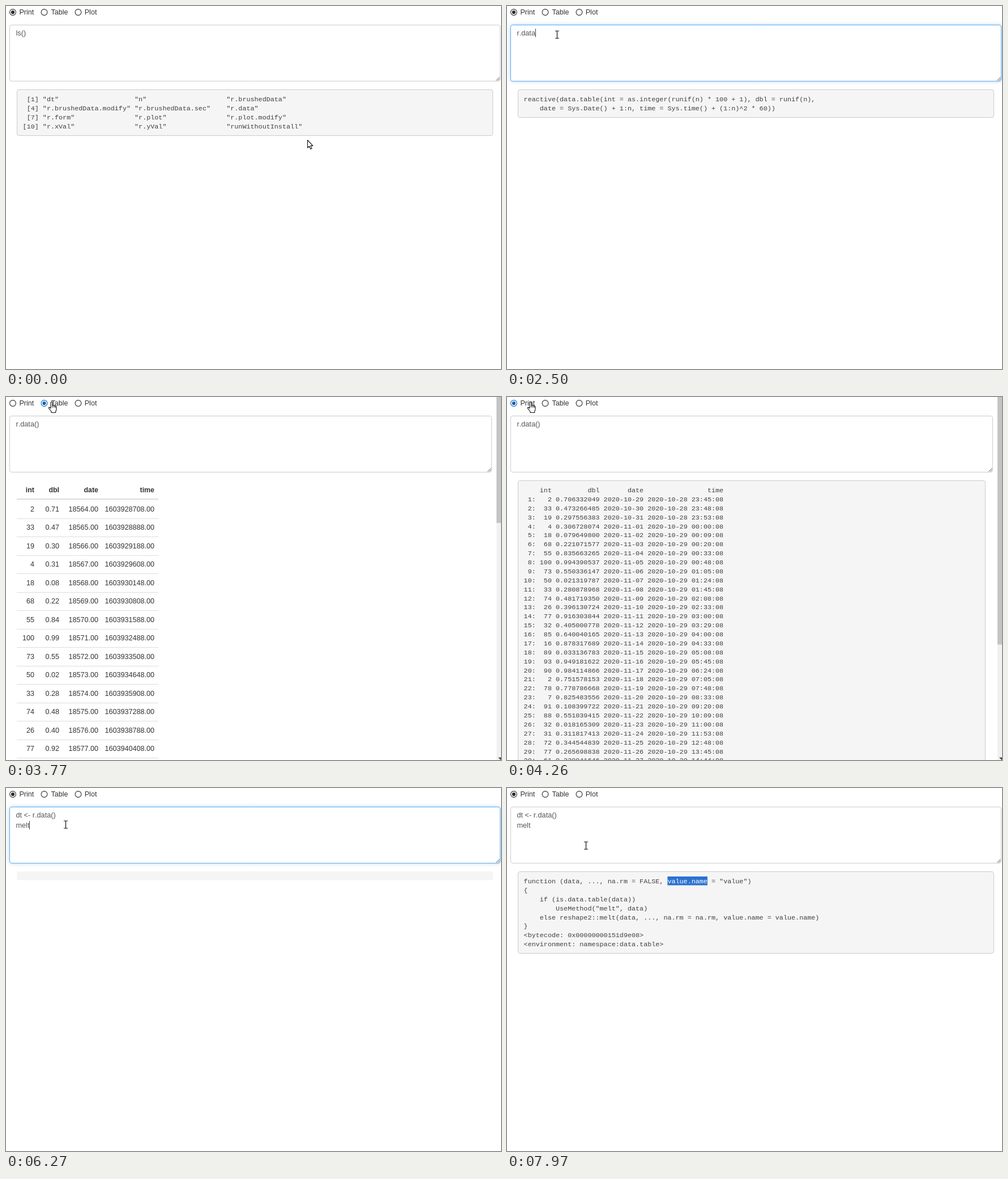
An HTML page with a canvas for the animation above (8 s loop, 874 by 640 pixels).

```html
<!DOCTYPE html>
<html lang="en">
<head>
<meta charset="utf-8">
<title>R console</title>
<style>
  html, body { margin: 0; width: 100%; height: 100%; overflow: hidden; background: #fff; }
  canvas { display: block; }
</style>
</head>
<body>
<canvas id="stage" width="874" height="640"></canvas>
<script>
const ctx = document.getElementById('stage').getContext('2d');
const LOOP = 8000, STEP = LOOP / 104;
const MONO = '11.75px "Liberation Mono", monospace';
const LABEL = '12.6px "Liberation Sans", Arial, sans-serif';
const INPUT = '12.7px "Liberation Sans", Arial, sans-serif';
const BOLD = 'bold 12.4px "Liberation Sans", Arial, sans-serif';
const CHAR = 7.05, LINE = 15.88, PRE_X = 29.6, BASE_Y = 168;
const SELECT = '#2c72d0', CODE = '#404040';

const clamp = v => Math.max(0, Math.min(1, v));
const ease = k => k * k * (3 - 2 * k);
const latest = (list, t) => list.filter(e => e.at <= t).pop();

function seeded(seed) {
  return () => (seed = seed * 16807 % 2147483647) / 2147483647;
}

// the data set mirrors the R expression: runif values, daily dates, squared minutes
const SECOND = 1000, MINUTE = 60 * SECOND, DAY = 1440 * MINUTE;
const START = Date.UTC(2020, 9, 28, 23, 44, 8);
const runif = seeded(2020);
const rows = Array.from({ length: 30 }, (_, i) => ({
  int: Math.floor(runif() * 100 + 1),
  dbl: runif(),
  date: START + (i + 1) * DAY,
  time: START + (i + 1) ** 2 * MINUTE
}));
const stamp = (ms, length) => new Date(ms).toISOString().slice(0, length).replace('T', ' ');

const LISTING = [
  ['dt', 'n', 'r.brushedData'],
  ['r.brushedData.modify', 'r.brushedData.sec', 'r.data'],
  ['r.form', 'r.plot', 'r.plot.modify'],
  ['r.xVal', 'r.yVal', 'runWithoutInstall']
].map((names, i) => `[${i * 3 + 1}]`.padStart(4) + ' ' +
  names.map(n => `"${n}"`.padEnd(22)).join(' '));

const REACTIVE = [
  'reactive(data.table(int = as.integer(runif(n) * 100 + 1), dbl = runif(n), ',
  '    date = Sys.Date() + 1:n, time = Sys.time() + (1:n)^2 * 60))'
];

const DATA = ['    int         dbl       date                time'].concat(rows.map((r, i) =>
  `${i + 1}:`.padStart(3) + `${r.int}`.padStart(4) +
  ` ${r.dbl.toFixed(9)} ${stamp(r.date, 10)} ${stamp(r.time, 19)}`));

const MELT = [
  'function (data, ..., na.rm = FALSE, value.name = "value") ',
  '{',
  '    if (is.data.table(data)) ',
  '        UseMethod("melt", data)',
  '    else reshape2::melt(data, ..., na.rm = na.rm, value.name = value.name)',
  '}',
  '<bytecode: 0x00000000151d9e08>',
  '<environment: namespace:data.table>'
];

const OUTPUTS = [
  { at: 0, lines: LISTING },
  { at: 2350, lines: REACTIVE },
  { at: 3080, lines: DATA, thumb: 436.5 },
  { at: 3720, lines: DATA, thumb: 222, table: true },
  { at: 4160, lines: DATA, thumb: 436.5 },
  { at: 5040, lines: DATA, thumb: 436.5, alpha: 0.3 },
  { at: 5400, lines: [] },
  { at: 6600, lines: MELT }
];

const EDITS = [
  { at: 0, paste: 'ls()' },
  { at: 2050, paste: 'r.data' },
  { at: 2640, keys: '()', gap: 80 },
  { at: 4560, keys: 'dt <- ', gap: 90, home: true },
  { at: 5700, keys: '\nmelt', gap: 100 }
];

const RADIOS = [
  { name: 'Print', cx: 12, x: 24 },
  { name: 'Table', cx: 67.5, x: 80 },
  { name: 'Plot', cx: 127.5, x: 139.3 }
];
const MODES = [{ at: 0, on: 'Print' }, { at: 3660, on: 'Table' }, { at: 4080, on: 'Print' }];
const FOCUS = [{ on: 1800, off: 3560 }, { on: 4560, off: 7400 }];

// pointer moves: start, end, destination; it rests in between
const HOME = { x: 532, y: 236 };
const MOVES = [
  [80, 460, 393, 182], [540, 850, 443, 184], [940, 1400, 52, 44], [1800, 1960, 20, 47],
  [2100, 2330, 88, 50], [2950, 3450, 84, 8], [3720, 4040, 42, 8], [4330, 4500, 18, 47],
  [4640, 5900, 130, 77], [5900, 6060, 105, 64], [6880, 7400, 335, 162], [7700, 7920, 139, 101]
];

function pointerAt(t) {
  let { x, y } = HOME;
  for (const [start, end, toX, toY] of MOVES) {
    const k = ease(clamp((t - start) / (end - start)));
    x += (toX - x) * k;
    y += (toY - y) * k;
  }
  return { x: Math.round(x), y: Math.round(y) };
}

function focusAt(t) {
  return Math.max(...FOCUS.map(f => clamp((t - f.on) / 150) * clamp(1 - (t - f.off) / 150)));
}

function inputAt(t) {
  let value = '', caret = 0, since = 0;
  for (const { at, paste, keys, gap, home } of EDITS.filter(e => e.at <= t)) {
    since = at;
    if (paste) {
      value = paste;
      caret = value.length;
      continue;
    }
    const count = Math.min(keys.length, Math.floor((t - at) / gap));
    const typed = keys.slice(0, count);
    since += count * gap;
    value = home ? typed + value : value + typed;
    caret = home ? count : value.length;
  }
  return { value, caret, since };
}

function text(str, x, y, font, color, kerning = 'normal', align = 'left') {
  ctx.font = font;
  ctx.fontKerning = kerning;
  ctx.textAlign = align;
  ctx.fillStyle = color;
  ctx.fillText(str, x, y);
}

function rect(x, y, w, h, color) {
  ctx.fillStyle = color;
  ctx.fillRect(x, y, w, h);
}

function box(x, y, w, h, fill, stroke) {
  ctx.beginPath();
  ctx.roundRect(x, y, w, h, 3.5);
  ctx.fillStyle = fill;
  ctx.fill();
  if (!stroke) return;
  ctx.shadowColor = 'transparent';
  ctx.strokeStyle = stroke;
  ctx.lineWidth = 1;
  ctx.stroke();
}

function disc(x, y, r) {
  ctx.beginPath();
  ctx.arc(x, y, r, 0, Math.PI * 2);
}

function drawRadios(t, pointer) {
  const mode = latest(MODES, t).on;
  for (const { name, cx, x } of RADIOS) {
    const checked = name === mode;
    const hover = pointer.y < 22 && pointer.x > cx - 6 && pointer.x < x + 30;
    const color = checked && hover ? '#0b63b5' : '#2b2b2b';
    disc(cx, 11, 5.4);
    ctx.strokeStyle = color;
    ctx.lineWidth = 1.1;
    ctx.stroke();
    if (checked) {
      disc(cx, 11, 3.1);
      ctx.fillStyle = color;
      ctx.fill();
    }
    text(name, x - 0.6, 15, LABEL, '#333');
  }
}

function drawHandle(right) {
  ctx.beginPath();
  for (const d of [6, 3]) {
    ctx.moveTo(right - 1 - d, 131.5);
    ctx.lineTo(right - 1, 131.5 - d);
  }
  ctx.strokeStyle = '#555';
  ctx.lineWidth = 1;
  ctx.stroke();
}

function drawInput(t, right) {
  const focus = focusAt(t);
  const mix = (a, b) => Math.round(a + (b - a) * focus);
  ctx.save();
  ctx.shadowColor = `rgba(102,175,233,${0.6 * focus})`;
  ctx.shadowBlur = 7;
  box(6.5, 33.5, right - 6.5, 99, '#fff', `rgb(${mix(204, 102)},${mix(204, 175)},${mix(204, 233)})`);
  ctx.restore();
  drawHandle(right);

  const { value, caret, since } = inputAt(t);
  const selected = t >= 1920 && t < 2050;
  if (selected) rect(17.5, 41, 18.5, 14, SELECT);
  value.split('\n').forEach((line, i) =>
    text(line, 17.5, 52 + i * 17.5, INPUT, selected ? '#fff' : '#555', 'none'));

  const blink = Math.floor((t - since) / 530) % 2 === 0;
  if (focus === 1 && blink && !selected) {
    const before = value.slice(0, caret).split('\n');
    const x = 17.5 + ctx.measureText(before[before.length - 1]).width;
    rect(Math.round(x), 40 + Math.round((before.length - 1) * 17.5), 1, 15, '#444');
  }
}

function drawSelection(row, col, word) {
  const x = PRE_X + col * CHAR, y = BASE_Y + row * LINE;
  rect(x, Math.round(y - 12.3), word.length * CHAR, 15.5, SELECT);
  text(word, x, y, MONO, '#fff');
}

function drawOutput(t, lines, right, alpha = 1) {
  ctx.globalAlpha = alpha;
  if (lines.length) {
    box(19.5, 147.5, right - 19.5, Math.round(lines.length * LINE + 17.3), '#f5f5f5', '#ccc');
  } else {
    box(19, 147, right - 18.5, 15.5, '#f5f5f5');
  }
  lines.forEach((line, i) => text(line, PRE_X, BASE_Y + i * LINE, MONO, CODE));
  ctx.globalAlpha = 1;

  if (lines === LISTING && t >= 540 && t < 1800) {
    drawSelection(1, 52, 'r.data'.slice(0, Math.ceil(6 * clamp((t - 540) / 280))));
  }
  if (lines === MELT && t >= 7550) drawSelection(0, 36, 'value.name');
}

function drawTable() {
  const ends = [50, 94, 163, 262], rowH = 32.5;
  const cells = (values, y, font) =>
    values.forEach((v, i) => text(v, ends[i], y, font, '#333', 'normal', 'right'));
  cells(['int', 'dbl', 'date', 'time'], 168, BOLD);
  rect(19, 179, 250, 2, '#ddd');
  rows.slice(0, 15).forEach((r, i) => {
    const y = 181 + i * rowH;
    if (i) rect(19, Math.round(y), 250, 1, '#ddd');
    const numbers = [r.dbl, Math.floor(r.date / DAY), r.time / SECOND].map(v => v.toFixed(2));
    cells([r.int, ...numbers], y + 20.5, LABEL);
  });
}

function drawScrollbar(thumb) {
  rect(866, 0, 8, 640, '#f1f1f1');
  rect(866, 0, 8, thumb, '#c4c4c4');
  ctx.fillStyle = '#404040';
  ctx.beginPath();
  ctx.moveTo(869, 635.5);
  ctx.lineTo(878, 635.5);
  ctx.lineTo(873.5, 640);
  ctx.fill();
}

function outline(d, fill = '#fff') {
  const path = new Path2D(d);
  ctx.lineJoin = 'round';
  ctx.lineWidth = 1.1;
  ctx.strokeStyle = '#111';
  ctx.fillStyle = fill;
  ctx.fill(path);
  ctx.stroke(path);
}

const CURSORS = {
  arrow() {
    outline('M.5 .5V14L3.6 11.2 5.7 16.2 7.9 15.2 5.8 10.4H9.8Z');
  },
  beam() {
    const bar = new Path2D('M-3.5 -6.5H-1Q0 -6.5 0 -5.5Q0 -6.5 1 -6.5H3.5M0 -6V6M-3.5 6.5H-1Q0 6.5 0 5.5Q0 6.5 1 6.5H3.5');
    ctx.translate(0.5, 0.5);
    for (const [width, color] of [[2.6, 'rgba(255,255,255,.8)'], [1.2, '#111']]) {
      ctx.lineWidth = width;
      ctx.strokeStyle = color;
      ctx.stroke(bar);
    }
  },
  hand() {
    ctx.translate(-0.5, 0);
    outline('M-1.5 12V2Q-1.5 .5 0 .5T1.5 2V7Q3 5.8 4.3 7.4Q5.8 6.5 6.8 8.2Q8.5 7.8 8.5 9.8V13.5' +
      'Q8.5 15.5 7.2 17V19.5H-.5V17.5L-4.6 12.4Q-5.6 10.8 -4.4 10.2T-1.5 12Z');
    outline('M1.5 7V10.5M4.4 7.6V10.5M6.8 8.4V10.8', 'transparent');
  }
};

function drawPointer({ x, y }, lines) {
  const textEnd = BASE_Y + (lines.length - 1) * LINE + 7;
  const overText = (y >= 33 && y <= 133) || (y >= 152 && y <= textEnd);
  const overLabel = y < 22 && x < 165;
  ctx.save();
  ctx.translate(x, y);
  CURSORS[overLabel ? 'hand' : overText ? 'beam' : 'arrow']();
  ctx.restore();
}

function draw(t) {
  const pointer = pointerAt(Math.floor(t / STEP) * STEP);
  const { lines, thumb, table, alpha } = latest(OUTPUTS, t);
  const inset = thumb ? 15 : 0;

  rect(0, 0, 874, 640, '#fff');
  drawRadios(t, pointer);
  drawInput(t, 872.5 - inset);
  if (table) drawTable();
  else drawOutput(t, lines, 859.5 - inset, alpha);
  if (thumb) drawScrollbar(thumb);
  drawPointer(pointer, lines);
}

const origin = performance.now();
function tick() {
  draw((performance.now() - origin) % LOOP);
  requestAnimationFrame(tick);
}
tick();
</script>
</body>
</html>
```
